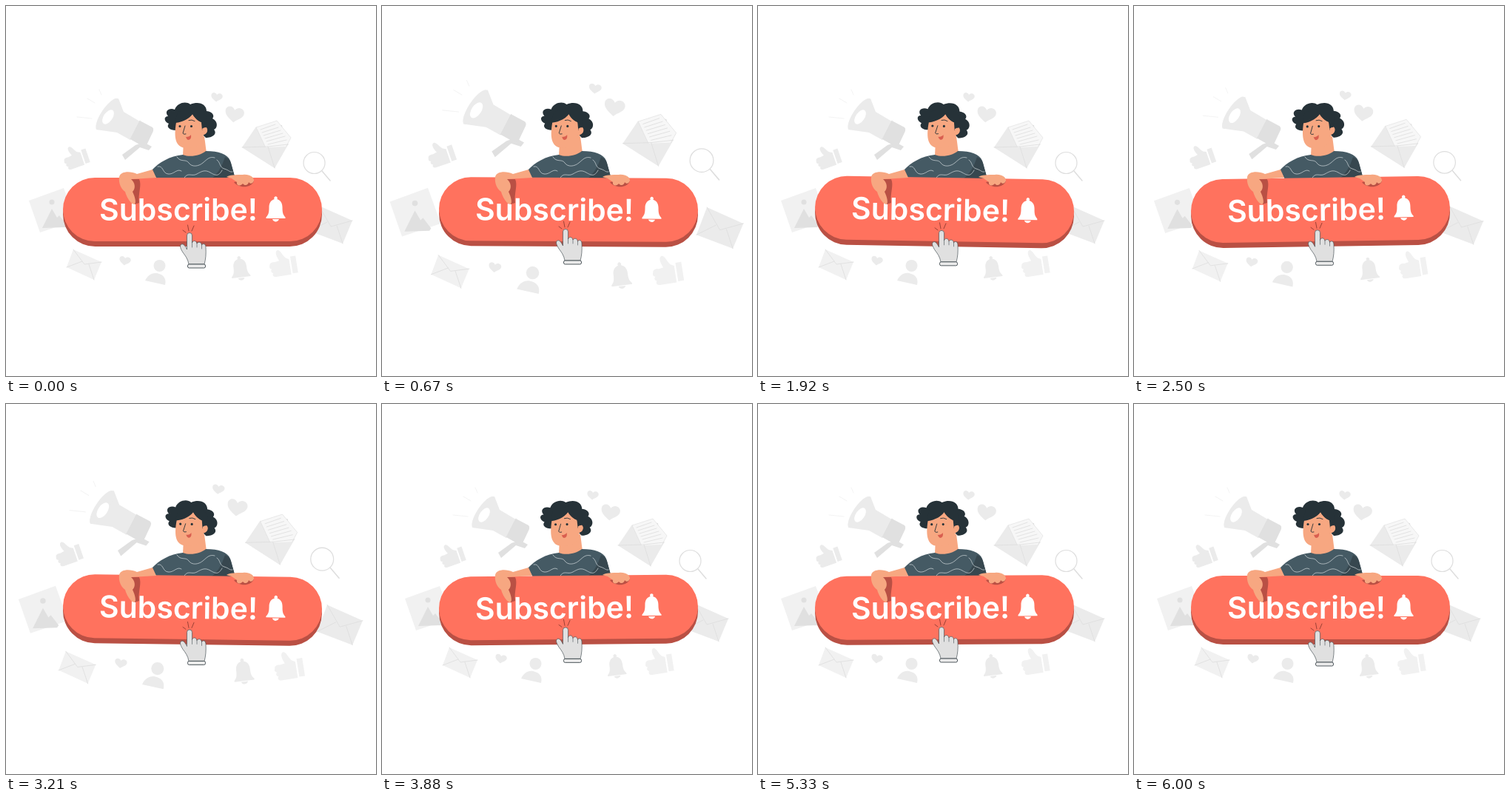
Write an HTML page that moves like this. It is 500x500 px and loops after 6.04 s.

```html
<!DOCTYPE html>
<html lang="en">
<head>
<meta charset="utf-8">
<title>Subscribe</title>
<style>
html, body { margin: 0; width: 100%; height: 100%; overflow: hidden; background: #fff; }
svg { display: block; width: 100vw; height: 100vh; }
text { font: 600 41px Inter, "Open Sans", sans-serif; fill: #fff; }
.a { fill: #ebebeb; }
.b { fill: #e0e0e0; }
.c { fill: #f1f1f1; }
.line { fill: none; stroke: #dedede; stroke-width: .8; stroke-linejoin: round; stroke-linecap: round; }
.skin { fill: #f7a781; }
.ink { fill: #263238; }
.pen { fill: none; stroke: #263238; stroke-width: .9; stroke-linecap: round; stroke-linejoin: round; }
.wave { fill: none; stroke: #c3ccd0; stroke-width: .8; stroke-linecap: round; }
</style>
</head>
<body>
<svg viewBox="0 0 500 500">
  <defs>
    <path id="heart" d="M0 6C-5 3-8 1-8-2.500C-8-6-3-7.500-.5-3.500C2-7.500 8-5.500 7.500-1.500C7 2 3 3 0 6Z"/>
    <path id="bell" d="M-1.800-14A2.300 2.300 0 1 1 1.800-14C7-12.500 9-8 9-3C9 5 10 7 13 10.500V12H-13V10.500C-10 7-9 5-9-3C-9-8-7-12.500-1.800-14ZM-4.500 13H4.500C3 17.500-3 17.500-4.500 13Z"/>
    <g id="thumb">
      <path d="M-17-1C-17-4-13-5-10-4L-4-5C-7-11-8-17-4-18C0-18 1-11 5-7L9-5V14H-11C-15 14-16 11-14 9C-17 8-17 5-15 4C-18 3-18 1-17-1Z"/>
      <path d="M11-8H18V13H11Z"/>
    </g>
  </defs>

  <g id="items">
    <path class="c" d="M31 263L78 246L94 290L46 306Z"/>
    <path class="b" d="M49 300L62 274L69 286L72 283L82 296L80 299Z"/>
    <circle class="b" cx="62" cy="265" r="3.500"/>

    <path class="a" d="M423 270L468 290L455 321L410 304Z"/>
    <path class="line" d="M423 270L439 298L468 290M410 304L434 292M455 321L447 297"/>

    <path class="c" d="M91 329L129 346L119 370L82 353Z"/>
    <path class="line" d="M91 329L106 349L129 346M82 353L103 345M119 370L112 349"/>

    <use href="#heart" class="a" transform="translate(285 123.500) rotate(8)"/>
    <use href="#heart" class="a" transform="translate(309 147) rotate(10) scale(1.650 1.750)"/>
    <use href="#heart" class="a" transform="translate(161 344.500) rotate(10)"/>

    <circle class="a" cx="207.500" cy="351" r="8"/>
    <path class="a" d="M188 371C191 364 197 360 204 361C213 363 217 368 215 377Z"/>

    <use href="#bell" class="a" transform="translate(316.500 355) rotate(-7) scale(.98 .96)"/>
    <use href="#thumb" class="c" transform="translate(374 349) rotate(-9) scale(1.040 1.100)"/>
    <use href="#thumb" class="a" transform="translate(94 205) rotate(-19) scale(.93)"/>

    <path class="b" d="M157 201L175 188L186 184L197 190L193 195L181 191L161 208Z"/>
    <path class="a" d="M122 167C119 157 136 127 152 125L159 143L181 156L168 181L150 171Z"/>
    <path class="b" d="M181 155L198 164Q200 166 199 169L190 188Q187 191 184 189L168 180Z"/>
    <path class="line" d="M181 155L168 180"/>
    <ellipse class="a" cx="137" cy="146" rx="8" ry="25" transform="rotate(34 137 146)"/>
    <ellipse cx="138" cy="150" rx="6" ry="11" transform="rotate(34 138 150)" fill="#fff"/>
    <path class="line" stroke-opacity=".45" d="M96 150L116 152M110 125L120 131M126 113L129 120"/>

    <path class="b" d="M338 164L362 160L373 161L374 171L381 187L350 195Z"/>
    <path class="a" d="M338 163L319 191L363 219L382 186L353 192Z"/>
    <path d="M338 164L366 155L385 178L378 191L352 194Z" fill="#f7f7f7" stroke="#dedede" stroke-width=".6"/>
    <path class="line" d="M344 167L364 160M346 171L368 164M348 175L371 168M350 179L374 172M352 183L377 176M354 187L379 181"/>
    <path class="a" d="M319 191L352 191L379 190L363 219Z"/>
    <path class="line" d="M319 191L354 190L363 219M354 190L381 187"/>

    <circle class="line" cx="416.500" cy="212" r="14.500" style="stroke-width:1.200"/>
    <path class="line" d="M427 223L438 236" style="stroke-width:1.500"/>
  </g>

  <path class="skin" d="M240 182L268 176L271 199C268 206 243 206 239 202Z"/>
  <path d="M197 222C207 211 221 203 239 201C249 205 263 202 270 196C288 196 299 200 303 209L310 234H204Z" fill="#455a64"/>
  <path d="M278 233C288 225 292 216 296 204C301 206 303 209 304 212L310 234Z" fill="#37474f"/>
  <path class="wave" d="M205 217C213 215 211 226 219 227S231 219 237 223M231 204C236 212 243 206 247 212S260 217 266 212S275 203 282 205M241 232C246 224 251 231 258 227S269 221 276 225S287 231 292 222M285 208C290 211 288 218 295 220S302 225 306 224"/>

  <g id="head">
    <path class="ink" d="M229 168C222 168 216 164 220 159C213 156 213 149 219 149C213 142 221 137 228 140C231 131 243 128 249 133C261 128 271 133 271 142C280 143 282 149 279 152C287 156 286 165 281 167C286 173 279 178 270 178L262 170Z"/>
    <path class="skin" d="M230 157C238 156 247 152 252 146C255 151 259 155 264 157L266 164C273 160 275 172 267 174C266 187 260 191 247 192C230 193 226 181 230 157Z"/>
    <path class="ink" d="M228 158C234 158 247 154 252 146C255 152 261 156 264 157L265 168L270 164L272 150L257 137L232 143Z"/>
    <path class="skin" d="M265 166C272 160 275 171 267 174Z"/>
    <circle class="ink" cx="235" cy="162.500" r="1.600"/>
    <circle class="ink" cx="250.500" cy="162.500" r="1.600"/>
    <path class="pen" d="M231 156.500L236 155M247 154.500Q251 153 255 155.500M242 162L239 172Q240 174 243 173"/>
    <path d="M243 177Q248 177 250 174Q251 181 246 181Q244 180 243 177Z" fill="#d95e4f"/>
  </g>

  <g id="button">
    <rect x="77" y="238" width="350" height="87" rx="43.500" fill="#b95044"/>
    <rect x="77" y="232" width="350" height="86" rx="43" fill="#ff725e"/>
    <text x="126" y="290">Subscribe!</text>
    <use href="#bell" fill="#fff" transform="translate(364.500 275)"/>
  </g>

  <path d="M167 234H180C184 242 178 254 180 266L174 268L166 250Z" fill="#b95044"/>
  <path class="skin" d="M198 221L177 227C168 223 155 223 153 231C152 239 155 247 161 251C163 258 168 267 173 268C177 267 174 257 171 251C176 246 174 238 169 234L203 232Z"/>
  <path d="M308 238C314 246 330 247 335 237L328 234Z" fill="#b95044"/>
  <path class="skin" d="M298 231C302 228 311 228 320 228C329 227 335 231 335 236C334 240 330 241 328 238C327 243 322 243 320 240C317 244 311 243 312 238L305 233Z"/>

  <g id="hand">
    <path d="M239 303L243 306M245.500 296L247 304M254 297L251 304" fill="none" stroke="#8f3b32" stroke-width=".9" stroke-linecap="round"/>
    <path d="M244.500 326V310A3.500 3.500 0 0 1 251.500 310V320C252 317 257 316 258 321C260 318 264 319 264.500 323C267 320 270 322 270 326C270.500 335 270 342 268 349H247C246 342 242 337 239 333C236 328 234 324 237 322C240 321 242 324 244.500 329Z" fill="#e0e0e0" stroke="#4a5358" stroke-width=".7"/>
    <path class="pen" d="M251.500 320V326M258 321V326M264.500 323V328" style="stroke-width:.5"/>
    <rect x="245.500" y="349" width="24" height="5" rx="2" fill="#ebebeb" stroke="#263238" stroke-width=".8"/>
  </g>
</svg>
<script>
const LOOP = 6040, SWAY = 1500;
const [items, head, button, hand] = ["items", "head", "button", "hand"].map(id => document.getElementById(id));
const move = (el, value) => el.setAttribute("transform", value);

// Two outward pulses, each with its own easing, then rest.
function pulse(t) {
  if (t < 600) return Math.sin(Math.PI / 2 * t / 600);
  if (t < 1900) return ((1900 - t) / 1300) ** 1.25;
  if (t < 2900) return ((t - 1900) / 1000) ** 3.3;
  return Math.max(0, (3770 - t) / 870);
}

function draw(now) {
  const t = now % LOOP;
  const phase = t < 4 * SWAY ? t / SWAY % 1 : 0;
  const swing = Math.sin(2 * Math.PI * phase);
  const lift = 5.6 * (1 - Math.abs(2 * phase - 1));
  move(items, `translate(250 248) scale(${1 + .1 * pulse(t)}) translate(-250 -248)`);
  move(head, `rotate(${1.5 * swing} 254 195)`);
  move(button, `rotate(${swing} 252 278)`);
  move(hand, `translate(0 ${-lift})`);
}

const start = performance.now();
function tick() {
  draw(performance.now() - start);
  requestAnimationFrame(tick);
}
tick();
</script>
</body>
</html>
```
